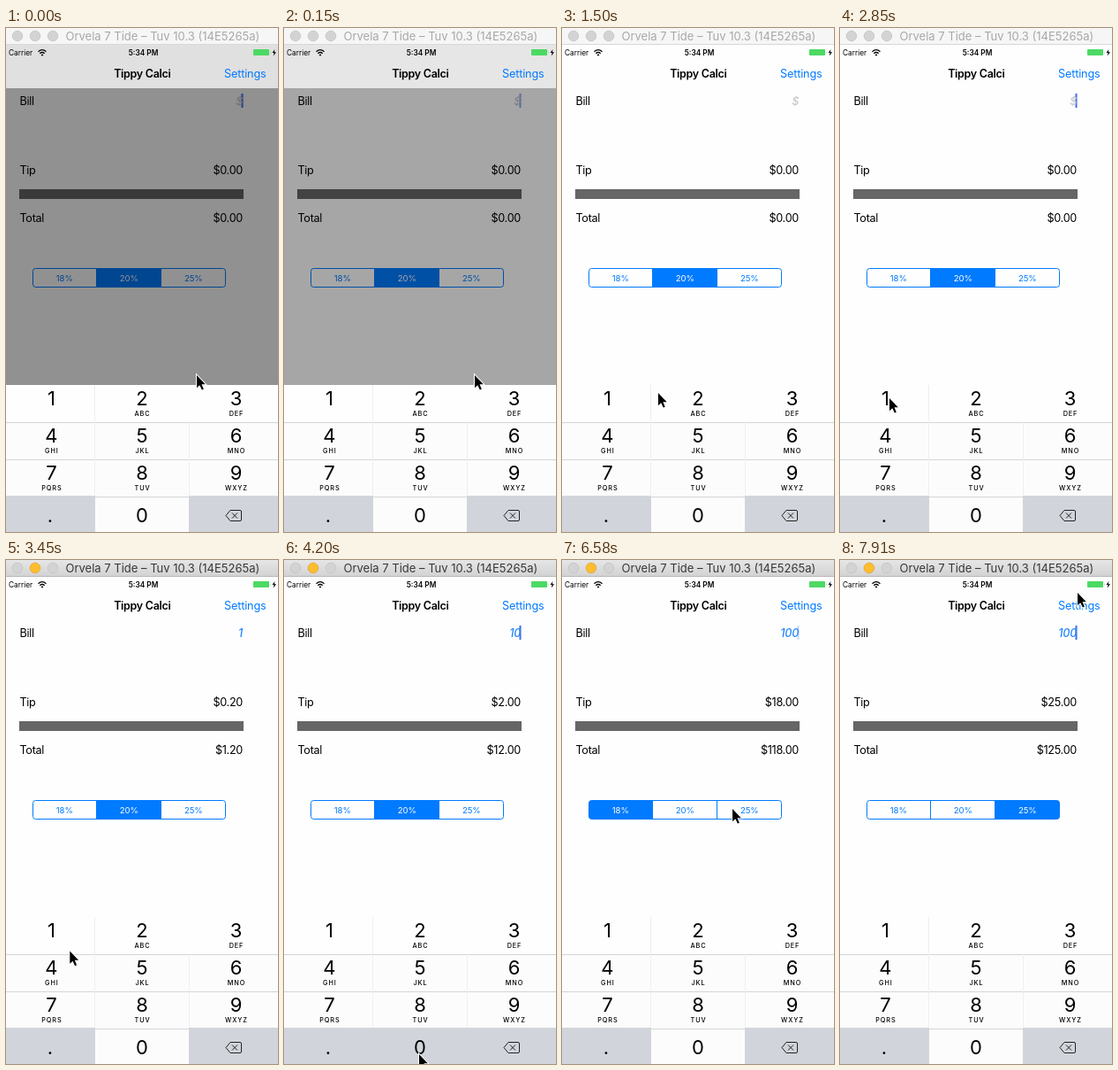
An HTML page for the animation above (8 s loop, 308 by 569 pixels).

```html
<!DOCTYPE html>
<html lang="en">
<head>
<meta charset="utf-8">
<title>Tip calculator</title>
<style>
html, body { margin: 0; width: 100%; height: 100%; overflow: hidden; background: #fefefe; }
svg { display: block; width: 308px; height: 569px; }
text { font: 12.65px Inter, "Liberation Sans", sans-serif; letter-spacing: -.3px; }
.mid { text-anchor: middle; }
.end { text-anchor: end; }
.blue { fill: #007aff; }
.window { font-size: 13px; letter-spacing: 0; }
.small { font-size: 8.3px; letter-spacing: 0; }
.bold { font-weight: 600; }
.seg { font-size: 9.6px; letter-spacing: -.1px; }
.digit { font-size: 22px; letter-spacing: 0; }
.letters { font-size: 7.3px; font-weight: 500; letter-spacing: .9px; }
#bill { font-style: italic; font-weight: 500; }
</style>
</head>
<body>
<svg id="stage" viewBox="0 0 308 569">
  <defs>
    <linearGradient id="chrome" x2="0" y2="1">
      <stop stop-color="#e6e6e6"/><stop offset="1" stop-color="#d2d2d2"/>
    </linearGradient>
    <clipPath id="pill"><rect x="30.5" y="271.5" width="218" height="21" rx="3"/></clipPath>
  </defs>
  <rect width="308" height="569" fill="#fefefe"/>

  <g id="form">
    <rect x="15" y="182" width="254" height="11" fill="#666"/>
    <g id="segments"></g>
    <rect id="caret" x="266.5" y="74" width="2" height="16" fill="#426bf2"/>
    <text id="bill" class="end" x="268" y="87"></text>
  </g>
  <rect id="shade" y="68" width="308" height="336"/>
  <text x="15.5" y="87">Bill</text>
  <text x="15.5" y="165">Tip</text>
  <text x="15.5" y="219">Total</text>
  <text id="tip" class="end" x="268" y="165"></text>
  <text id="total" class="end" x="268" y="219"></text>

  <rect id="navShade" y="19" width="308" height="49"/>
  <text class="small" x="3" y="31">Carrier</text>
  <path d="M36.5 26.7q4.5-4 9 0M38.3 28.7q2.7-2.4 5.4 0" fill="none" stroke="#000" stroke-width="1.2"/>
  <path d="M39.6 30.2q1.4-1.2 2.8 0L41 31.8z"/>
  <text class="small bold mid" x="155.5" y="31">5:34 PM</text>
  <rect x="280" y="24" width="18" height="7" rx=".8" fill="#4cd964"/>
  <path d="M299 26.3q1.3 1.2 0 2.4z" fill="#4cd964"/>
  <path d="M304.5 24l-3 4h2l-.8 3.4 3.3-4.2h-2.2z"/>
  <text class="bold mid" x="154.3" y="56" style="font-size:12.5px">Tippy Calci</text>
  <text class="blue" x="247" y="56" style="letter-spacing:-.15px">Settings</text>

  <g id="keys"></g>
  <g fill="none" stroke="#222">
    <path d="M254 544.5h11q1.5 0 1.5 1.5v9q0 1.5-1.5 1.5h-11l-5-6z"/>
    <path d="M256 547.5l6 6m0-6l-6 6"/>
  </g>

  <rect id="bar" width="308" height="19"/>
  <path id="barEdge" d="M0 18.5H308"/>
  <g stroke-width=".7">
    <circle cx="13" cy="9" r="5.8" fill="#d3d3d3" stroke="#c0c0c0"/>
    <circle id="yellow" cx="33" cy="9" r="5.8"/>
    <circle cx="53" cy="9" r="5.8" fill="#d3d3d3" stroke="#c0c0c0"/>
  </g>
  <text id="title" class="window" x="67.5" y="14">Orvela 7 Tide – Tuv 10.3 (14E5265a)</text>

  <path id="cursor" d="M1 1V15.2L4.3 12.2 6.8 17.6 8.8 16.7 6.5 11.3H10.8Z"
    stroke="#fff" stroke-width="2" paint-order="stroke"/>
</svg>
<script>
const $ = id => document.getElementById(id);
const LOOP = 8000;
const RATES = [18, 20, 25];

// Cursor tip: [time, x, y]
const PATH = [
  [0, 215, 391], [1080, 215, 391], [1650, 70, 418], [2430, 70, 418], [2800, 55, 417],
  [3330, 55, 417], [4050, 152, 557], [5000, 152, 557], [5540, 101, 286], [5690, 78, 282],
  [6290, 78, 282], [6580, 192, 280], [7020, 219, 281], [7480, 219, 281], [7910, 268, 36], [LOOP, 268, 36]
];

const LETTERS = ['', 'ABC', 'DEF', 'GHI', 'JKL', 'MNO', 'PQRS', 'TUV', 'WXYZ'];
const EDGES = [0, 101, 207, 308], CENTERS = [51.4, 154, 260.5], ROWS = [403, 445, 487, 528];

function buildKeys() {
  let out = '';
  for (let i = 0; i < 12; i++) {
    const col = i % 3, row = i / 3 | 0, x = CENTERS[col], y = ROWS[row];
    const label = i < 9 ? i + 1 : ['.', '0', ''][col];
    const fill = row == 3 && col != 1 ? '#d1d5db' : row ? '#fcfcfc' : '#fefefe';
    out += `<rect id="key${i}" x="${EDGES[col]}" y="${y}" width="${EDGES[col + 1] - EDGES[col]}" height="42" fill="${fill}"/>
      <text class="digit mid" x="${x - (i == 9 ? 1.5 : 0)}" y="${y + (row == 3 ? 30 : 23)}">${label}</text>
      <text class="letters mid" x="${x + .5}" y="${y + 34.5}">${LETTERS[i] || ''}</text>`;
  }
  $('keys').innerHTML = out + `<path d="M0 445.5H308M0 487.5H308M101 529.5H207" stroke="#d4d5d7"/>
    <path d="M100.5 403V528M207.5 445V528" stroke="#efeff0"/>`;
}

function buildSegments() {
  const cells = RATES.map((rate, i) => `<rect id="cell${i}" class="blue" x="${30 + 73 * i}" y="271" width="73" height="22" clip-path="url(#pill)"/>
    <text id="rate${i}" class="seg mid" x="${66.3 + 73 * i}" y="285.7">${rate}%</text>`).join('');
  $('segments').innerHTML = cells + `<rect x="30.5" y="271.5" width="218" height="21" rx="3" fill="none" stroke="#007aff"/>
    <path d="M102.5 271V293M175.5 271V293" stroke="#007aff"/>`;
}

const clamp = v => Math.max(0, Math.min(1, v));
const money = v => '$' + v.toFixed(2);

function cursorAt(t) {
  const i = PATH.findIndex(p => p[0] > t);
  const [t0, x0, y0] = PATH[i - 1], [t1, x1, y1] = PATH[i];
  const k = (t - t0) / (t1 - t0);
  return [x0 + (x1 - x0) * k, y0 + (y1 - y0) * k];
}

function caretAlpha(t) {
  const typing = t >= 2960 && t < 3450 || t >= 4150 && t < 5080;
  if (typing) return 1;
  const p = t % 1000;
  return p < 350 ? 1 - clamp((p - 90) / 160) : clamp((p - 540) / 150);
}

function draw(t) {
  const shade = .43 * (1 - clamp(t / 1050)) ** 1.35;
  $('shade').setAttribute('opacity', shade);
  $('navShade').setAttribute('opacity', shade * .27);

  const active = t >= 3000;
  $('bar').setAttribute('fill', active ? 'url(#chrome)' : '#f6f6f6');
  $('barEdge').setAttribute('stroke', active ? '#b8b8b8' : '#d8d8d8');
  $('title').setAttribute('fill', active ? '#383838' : '#a8a8a8');
  $('yellow').setAttribute('fill', active ? '#fdbd2e' : '#d3d3d3');
  $('yellow').setAttribute('stroke', active ? '#dea030' : '#c0c0c0');

  const bill = t < 3000 ? 0 : t < 4200 ? 1 : t < 4650 ? 10 : 100;
  const choice = t < 5990 ? 1 : t < 7170 ? 0 : 2;
  const tip = bill * RATES[choice] / 100;
  $('bill').textContent = bill || '$';
  $('bill').setAttribute('fill', bill ? '#2488fb' : '#c7c7cd');
  $('tip').textContent = money(tip);
  $('total').textContent = money(bill + tip);
  $('caret').setAttribute('opacity', caretAlpha(t));
  RATES.forEach((_, i) => {
    $('cell' + i).setAttribute('opacity', +(i == choice));
    $('rate' + i).setAttribute('fill', i == choice ? '#fff' : '#007aff');
  });

  $('key0').setAttribute('fill', t >= 3000 && t < 3150 ? '#d1d5db' : '#fefefe');
  $('key10').setAttribute('fill', t >= 4200 && t < 4350 ? '#d1d5db' : '#fcfcfc');
  $('cursor').setAttribute('transform', `translate(${cursorAt(t)})`);
}

buildKeys();
buildSegments();
const start = performance.now();
function tick() {
  draw((performance.now() - start) % LOOP);
  requestAnimationFrame(tick);
}
tick();
</script>
</body>
</html>
```
